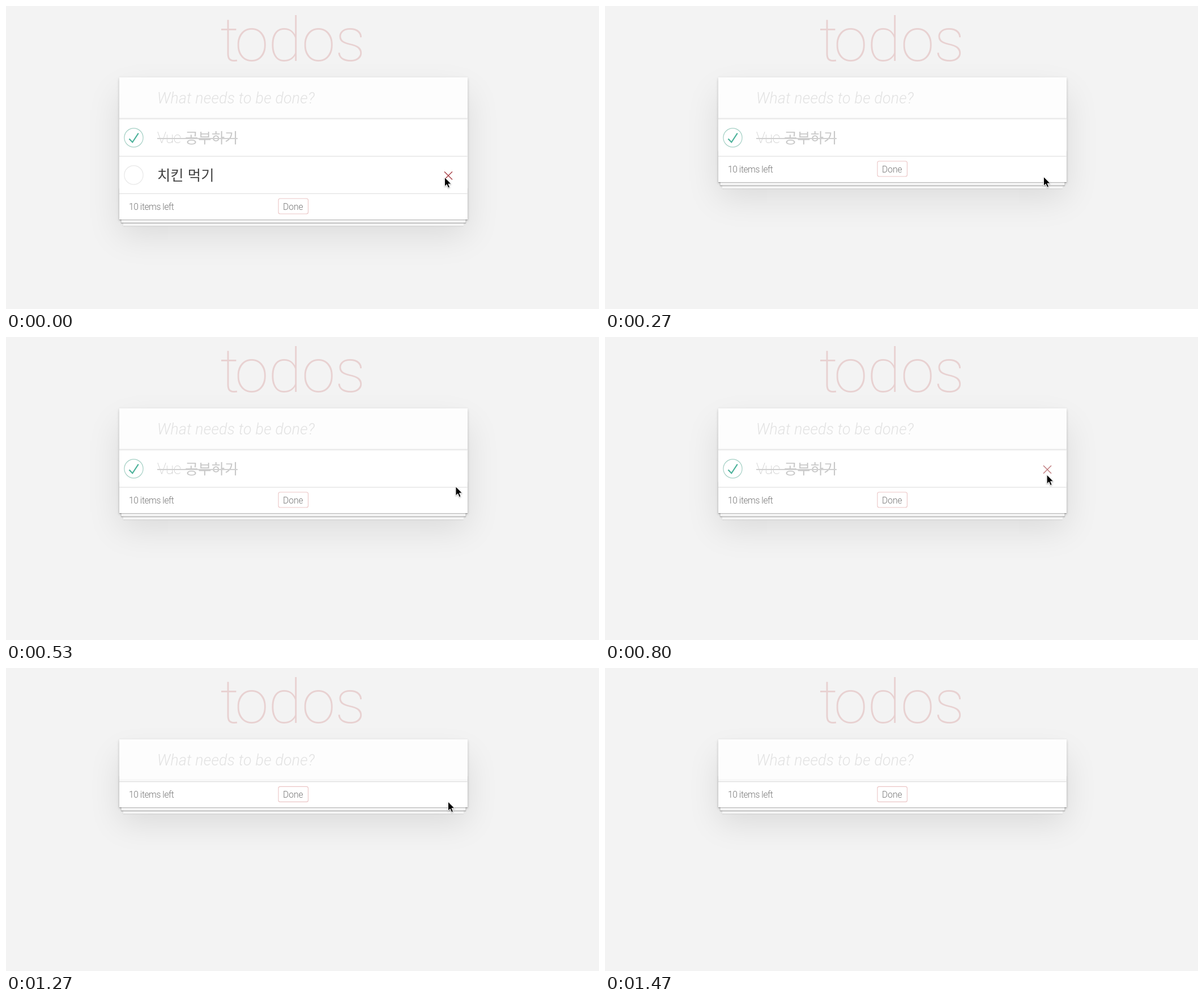
Animation, 1047 px wide and 535 px high, one loop 2140 ms. Source, as an HTML page:

```html
<!DOCTYPE html>
<html lang="ko">
<head>
<meta charset="utf-8">
<style>
html, body { margin: 0; width: 100%; height: 100%; overflow: hidden; background: #f3f3f3; }
div, svg { position: absolute; }
#card {
  left: 200px; top: 126px; width: 614.5px; background: #fff;
  box-shadow: 0 2.2px 4.5px rgba(0,0,0,.2), 0 28px 56px rgba(0,0,0,.1);
}
#stack {
  left: 0; right: 0; bottom: 0; height: 56px;
  box-shadow: 0 1.1px 1.1px rgba(0,0,0,.3),
    0 9px 0 -3.4px #f6f6f6, 0 10px 1.1px -3.4px rgba(0,0,0,.3),
    0 18px 0 -6.7px #f6f6f6, 0 19px 2.2px -6.7px rgba(0,0,0,.3);
}
#input {
  left: 0; right: 0; top: 0; height: 73px; background: #fdfdfd;
  box-shadow: inset 0 -2.2px 1.1px rgba(0,0,0,.03);
}
svg { left: 0; top: 0; fill: none; }
text { font: 300 26.8px Roboto, sans-serif; }
.title { font-size: 108px; font-weight: 100; fill: #e8d1d1; }
.hint { font-style: italic; letter-spacing: .2px; fill: #e2e2e2; }
.ko { font: 100 25.4px "Noto Sans CJK KR", "Noto Sans CJK", sans-serif; }
.done { font-weight: 100; fill: #c8c8c8; }
.small { font-size: 15.65px; fill: #777; }
.line { stroke: #dadada; stroke-width: 1.1; }
</style>
</head>
<body>
<div id="card"><div id="stack"></div><div id="input"></div></div>
<svg width="1047" height="535">
  <text class="title" x="378 404 463 522 581" y="97">todos</text>
  <text class="hint" x="267" y="172">What needs to be done?</text>
  <g id="row1">
    <path class="line" d="M200 199.2H814.5"/>
    <circle cx="225.5" cy="232.5" r="16.6" stroke="#a5d0c5" stroke-width="1.2"/>
    <path d="M217.5 234.5L223.3 240.6L233.8 224.6" stroke="#4fb39c" stroke-width="2.2"/>
    <text class="done" x="267" y="242" letter-spacing="-.8">Vue</text>
    <text class="ko done" x="316" y="242">공부하기</text>
    <path d="M267 234H409" stroke="#d0d0d0" stroke-width="2"/>
  </g>
  <g id="row2">
    <path class="line" d="M200 265.3H814.5"/>
    <circle cx="225.5" cy="298.5" r="16.6" stroke="#e8e8e8" stroke-width="1.2"/>
    <text class="ko" x="267" y="308" fill="#404040">치킨 먹기</text>
  </g>
  <g id="footer">
    <path class="line" d="M200 331.2H814.5"/>
    <text class="small" x="217" y="360" letter-spacing="-.45">10 items left</text>
    <rect x="481" y="340" width="52.5" height="27" rx="3" stroke="#ebc5c5" stroke-width="1.1"/>
    <text class="small" x="489" y="360">Done</text>
  </g>
  <path id="cross" d="M-7 -7L7 7M7 -7L-7 7" stroke-width="1.5"/>
  <path id="cursor" d="M0 0V16.2L3.7 12.7L6.3 18.7L9 17.5L6.5 11.7H11.6Z" fill="#000" stroke="#fff"
    style="filter: drop-shadow(0 1px 1px rgba(0,0,0,.3))"/>
</svg>
<script>
const LOOP = 2140, FPS = 15;
const $ = id => document.getElementById(id);
const show = (id, on) => $(id).setAttribute("visibility", on ? "visible" : "hidden");
const move = (id, x, y) => $(id).setAttribute("transform", `translate(${x} ${y})`);
const clamp = v => Math.max(0, Math.min(1, v));

// cursor path: tick, x, y
const path = [[0, 774.5, 302.5], [1, 774.5, 302], [2, 774.5, 301.5], [4, 774.5, 301.5],
  [6, 784, 287], [8, 794, 264], [11, 780, 245], [16, 780.5, 236]];
const cardHeight = [120, 184.6, 250.6];
const footerShift = [-130.6, -66, 0];

function cursorAt(tick) {
  const i = path.findIndex(p => p[0] > tick);
  if (i < 0) return path.at(-1).slice(1);
  const a = path[i - 1], b = path[i], k = (tick - a[0]) / (b[0] - a[0]);
  return [1, 2].map(j => a[j] + (b[j] - a[j]) * k);
}

function draw(now) {
  // ticks start on times rounded to 10 ms
  const tick = Math.floor((now % LOOP + 4) * FPS / 1000);
  const rows = tick < 4 ? 2 : tick < 19 ? 1 : 0;
  const [x, y] = cursorAt(tick);
  $("card").style.height = cardHeight[rows] + "px";
  move("footer", 0, footerShift[rows]);
  show("row1", rows > 0);
  show("row2", rows > 1);

  // the cross appears on row hover, then darkens under the pointer
  const hot = rows > 1 ? 1 : clamp((tick - 11) / 3);
  const mix = (a, b) => Math.round(a + (b - a) * hot);
  show("cross", rows > 1 || rows === 1 && tick > 8);
  $("cross").setAttribute("stroke", `rgb(${mix(204, 170)},${mix(154, 70)},${mix(154, 76)})`);
  move("cross", 781, rows > 1 ? 299.5 : 234);

  show("cursor", tick < 22);
  move("cursor", x, y);
}

const start = performance.now();
function loop() {
  draw(performance.now() - start);
  requestAnimationFrame(loop);
}
loop();
</script>
</body>
</html>
```
